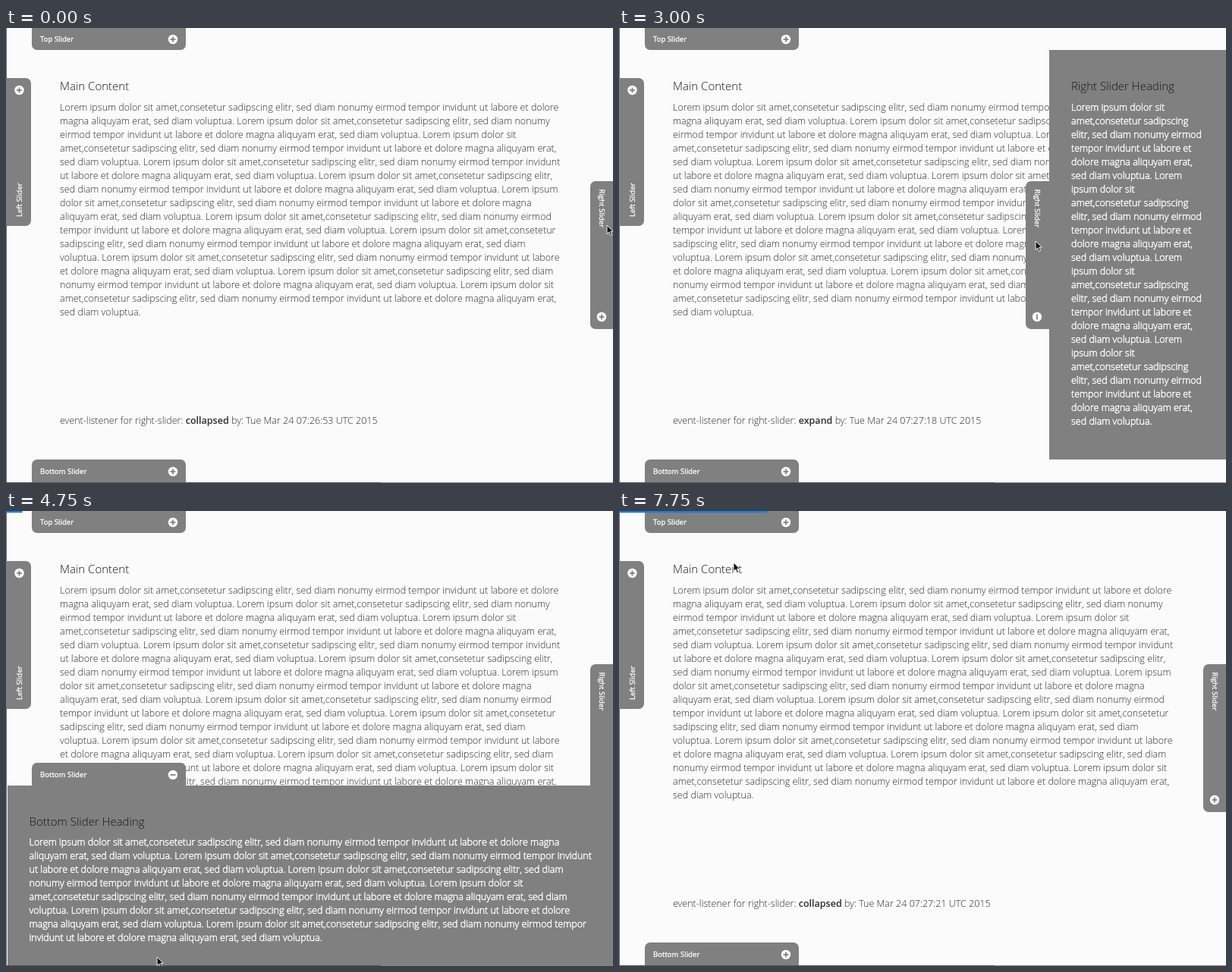
Recreate the animation shown at these times as an HTML page. Size 800 by 600 pixels, loop 8 s.

```html
<!DOCTYPE html>
<html lang="en">
<head>
<meta charset="utf-8">
<title>Edge sliders</title>
<style>
  html, body { margin: 0; width: 100%; height: 100%; overflow: hidden; background: #fbfbfb; }
  svg { display: block; width: 800px; height: 600px; }
  text { font-family: "Open Sans", "Noto Sans", sans-serif; font-weight: 300; white-space: pre; }
  .body { font-size: var(--size, 12.5px); fill: #2c2c2c; }
  .head { font-size: calc(var(--size, 12.5px) * 1.2); fill: #151515; }
  .panel .body { fill: #fff; stroke: #fff; stroke-width: .45px; }
  .label { font-size: 9.6px; font-weight: 400; fill: #fff; stroke: #fff; stroke-width: .3px; }
  .strong { font-weight: 600; }
  .grey { fill: #808080; }
  .icon circle { fill: #fff; }
  .icon path { stroke: #808080; stroke-width: 1.8; }
</style>
</head>
<body>
<svg viewBox="0 0 800 600" xmlns="http://www.w3.org/2000/svg">
  <rect width="800" height="600" fill="#fbfbfb"/>
  <rect width="1" height="600" fill="#666"/>

  <text class="head" x="71" y="82">Main Content</text>
  <text class="body" id="mainText"></text>
  <text class="body" x="71" y="521.5">event-listener for right-slider: <tspan class="strong" id="state">collapsed</tspan> by: Tue Mar 24 07:<tspan id="clock">26:53</tspan> UTC 2015</text>

  <rect class="grey" x="34" y="-10" width="203" height="39" rx="7"/>
  <text class="label" x="45" y="18">Top Slider</text>
  <g class="icon" transform="translate(220 15)"></g>

  <rect class="grey" x="-10" y="66" width="43" height="195" rx="7"/>
  <text class="label" transform="translate(21 249) rotate(-90)">Left Slider</text>
  <g class="icon" transform="translate(17.5 82) rotate(-90)"></g>

  <g class="panel" id="right">
    <rect class="grey" x="770" y="202" width="41" height="195" rx="7"/>
    <text class="label" transform="translate(782 212.5) rotate(90)">Right Slider</text>
    <g class="icon" transform="translate(785 381) rotate(90)"></g>
    <rect class="grey" x="801" y="29" width="300" height="540"/>
    <text class="head" x="830" y="82">Right Slider Heading</text>
    <text class="body" id="rightText"></text>
  </g>

  <g class="panel" id="bottom">
    <rect class="grey" x="34" y="569" width="203" height="40" rx="7"/>
    <text class="label" x="45" y="588">Bottom Slider</text>
    <g class="icon" transform="translate(220 585)"></g>
    <rect class="grey" x="2" y="599" width="798" height="260"/>
    <text class="head" x="30.5" y="651.5">Bottom Slider Heading</text>
    <text class="body" id="bottomText"></text>
  </g>

  <rect y="599" width="800" height="1" fill="#888"/>
  <rect y="599" width="494" height="1" fill="#555"/>
  <rect id="bar" width="0" height="2.3" fill="#177de4"/>
  <path id="cursor" d="M0 0V11.5L2.7 9L4.7 13.6L6.7 12.7L4.7 8.3H8.3Z" fill="#111" stroke="#fff" stroke-width=".9"/>
</svg>

<script>
const LOOP = 8000, STEP = 250, SLIDE = 500, BAR_SPEED = 0.72;
const $ = id => document.getElementById(id);
const svgEl = (tag, attrs, parent) => {
  const el = document.createElementNS('http://www.w3.org/2000/svg', tag);
  for (const key in attrs) el.setAttribute(key, attrs[key]);
  return parent.appendChild(el);
};

const lorem = 'Lorem ipsum dolor sit amet,consetetur sadipscing elitr, sed diam nonumy eirmod ' +
  'tempor invidunt ut labore et dolore magna aliquyam erat, sed diam voluptua.';

// Wraps the repeated sentence into lines no wider than the column.
function fillText(id, x, y, width, repeats) {
  const newLine = () => svgEl('tspan', { x, y: y + $(id).childElementCount * 18 }, $(id));
  let line = newLine();
  for (const word of Array(repeats).fill(lorem).join(' ').split(' ')) {
    const before = line.textContent;
    line.textContent = before ? before + ' ' + word : word;
    if (before && line.getComputedTextLength() > width) {
      line.textContent = before;
      line = newLine();
      line.textContent = word;
    }
  }
}

// One font size for all copy, chosen from the length of a full line.
const probe = $('mainText');
probe.textContent = lorem.slice(0, lorem.indexOf(' magna'));
document.documentElement.style.setProperty('--size', 12.5 * 658 / probe.getComputedTextLength() + 'px');
probe.textContent = '';

fillText('mainText', 71, 108.5, 662, 11);
fillText('rightText', 830, 108.5, 175, 4);
fillText('bottomText', 30.5, 678, 743, 6);

document.querySelectorAll('.icon').forEach(icon => {
  svgEl('circle', { r: 6.2 }, icon);
  svgEl('path', { d: 'M-3.4 0H3.4' }, icon);
  svgEl('path', { d: 'M0 -3.4V3.4', class: 'upright' }, icon);
});

const clamp = p => Math.min(1, Math.max(0, p));
const swing = p => (1 - Math.cos(Math.PI * clamp(p))) / 2;

const slides = [
  { id: 'right', open: 1474, close: 2990, dx: -234, dy: 0, clocks: ['27:18', '27:19'] },
  { id: 'bottom', open: 4237, close: 6954, dx: 0, dy: -237, clocks: ['27:20', '27:21'] }
];
const barStarts = [3100, 4720, 7479];
const hops = [
  { from: 0, to: 1000, x: 772, y: 260 },
  { from: 2000, to: 2750, x: 549, y: 281 },
  { from: 3000, to: 4000, x: 199, y: 588 },
  { from: 4750, to: 5000, x: 156, y: 349 },
  { from: 7500, to: 7750, x: 151, y: 68 }
];

function moveCursor(t) {
  let x = 792, y = 260;
  for (const hop of hops) {
    const k = clamp((t - hop.from) / (hop.to - hop.from));
    x += (hop.x - x) * k;
    y += (hop.y - y) * k;
  }
  $('cursor').setAttribute('transform', `translate(${x} ${y})`);
}

function pose(t) {
  let state = 'collapsed', clock = '26:53';
  for (const s of slides) {
    const k = swing((t - s.open) / SLIDE) - swing((t - s.close) / SLIDE);
    $(s.id).setAttribute('transform', `translate(${Math.round(s.dx * k)} ${Math.round(s.dy * k)})`);

    const opened = t >= s.open + SLIDE, closed = t >= s.close + SLIDE;
    $(s.id).querySelector('.upright').style.display = opened && !closed ? 'none' : '';
    if (opened) {
      state = closed ? 'collapsed' : 'expand';
      clock = s.clocks[+closed];
    }
  }
  $('state').textContent = state;
  $('clock').textContent = clock;

  const start = barStarts.filter(s => s <= t).pop() ?? t;
  $('bar').setAttribute('width', Math.min(800, (t - start) * BAR_SPEED));
  moveCursor(t);
}

const t0 = performance.now();
function tick() {
  const t = (performance.now() - t0 + 12) % LOOP;
  pose(Math.floor(t / STEP) * STEP);
  requestAnimationFrame(tick);
}
tick();
</script>
</body>
</html>
```
